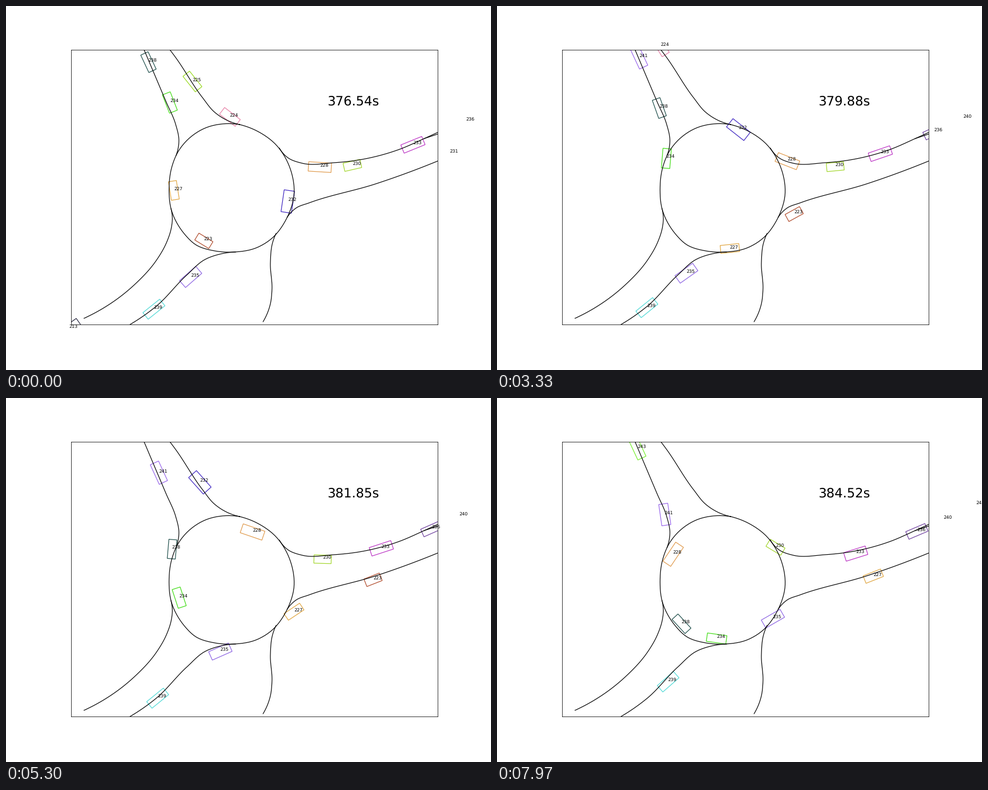
Write a matplotlib script that moves like this. It is 864 px wide and 648 px high and loops after 8 s.

```python
import math
import numpy as np
import matplotlib.pyplot as plt
from matplotlib.animation import FuncAnimation
from matplotlib.patches import Polygon

W, H = 864, 648
LOOP, INTERVAL = 8000, 32
FPS, FIRST, LAST_STEP = 29.97, 11285, 239
LEFT, RIGHT, TOP, BOTTOM = 116.4, 769.2, 77.76, 567.36
KEY_STEPS = np.array([0, 64, 137, 239])

plt.rcParams["font.family"] = "DejaVu Sans"
plt.rcParams["text.hinting"] = "none"
fig = plt.figure(figsize=(W / 72, H / 72), dpi=72, facecolor="white")
ax = fig.add_axes([LEFT / W, 1 - BOTTOM / H, (RIGHT - LEFT) / W, (BOTTOM - TOP) / H])
ax.set(xlim=(LEFT, RIGHT), ylim=(BOTTOM, TOP), xticks=[], yticks=[])
for spine in ax.spines.values():
    spine.set_linewidth(0.8)


def tangents(t, v):
    return np.gradient(v, t, axis=0, edge_order=min(2, len(t) - 1))


def hermite(t, v, m, x):
    """Smooth value at x between the keys v with tangents m."""
    i = int(np.clip(np.searchsorted(t, x, "right") - 1, 0, len(t) - 2))
    h = t[i + 1] - t[i]
    u = (x - t[i]) / h
    return ((1 + 2 * u) * (1 - u)**2 * v[i] + u * (1 - u)**2 * h * m[i]
            + u * u * (3 - 2 * u) * v[i + 1] + u * u * (u - 1) * h * m[i + 1])


class Path:
    """Smooth curve through points, measured by distance along them."""

    def __init__(self, *points):
        self.p = np.array(points, float)
        steps = np.hypot(*np.diff(self.p, axis=0).T)
        self.s = np.concatenate([[0], np.cumsum(steps)])
        self.m = tangents(self.s, self.p)
        self.length = self.s[-1]

    def at(self, s):
        return hermite(self.s, self.p, self.m, s)

    def heading(self, s):
        d = self.at(s + 0.5) - self.at(s - 0.5)
        return d / np.hypot(*d)


def road(*points):
    path = Path(*points)
    xy = np.array([path.at(s) for s in np.linspace(0, path.length, 120)])
    ax.plot(xy[:, 0], xy[:, 1], color="black", lw=1.2)


# roundabout, then its arms clockwise from the north
road((416, 211), (450, 224), (480, 246), (505, 286), (513, 337), (501, 376),
     (472, 415), (446, 430.5), (405, 438), (372, 436), (338, 425), (318, 406),
     (294, 361), (290.5, 325), (294.5, 290), (308, 257), (328, 234), (358, 216),
     (385, 210), (416, 211))
road((246, 78), (285, 170), (302, 210), (308, 240), (303, 266))
road((292, 78), (301, 90), (350, 163), (371, 188.5), (396, 204.5), (416, 211))
road((487, 253), (502, 270), (528, 280), (584, 279), (632, 273.5),
     (700, 255.5), (745, 236), (769, 225))
road((745, 236), (769, 228))
road((501, 376), (517, 359.5), (540, 350.5), (659, 316.5), (769, 276))
road((458, 562), (471, 530), (473.8, 505), (471, 457), (475, 421), (481, 405))
road((221, 567), (267, 535), (322, 479), (355, 451), (380, 442), (409, 438))
road((294, 361), (296.3, 378), (294.5, 395), (286, 421), (267, 454),
     (229, 496), (139, 556))

# lanes the cars drive along
north_east = Path((237, 57), (252, 89), (265, 117), (281.5, 154), (298, 202),
                  (301, 234), (298, 285), (299, 328), (320.5, 387),
                  (353.5, 418.7), (414.8, 431.7), (471, 407.5), (536, 367),
                  (606, 342), (712, 301), (830, 257))
west_east = Path((263.5, 539.8), (305, 505), (337, 476), (361.2, 461.4),
                 (410, 438.7), (491.6, 392.8), (536, 367))
ring_north = Path((488, 386), (502, 348), (495, 294.7), (475, 260), (430, 220),
                  (399, 197.5), (358.5, 164), (331, 133), (293.5, 75), (280, 53))
east_ring = Path((870, 182), (815, 207), (748, 237.5), (703, 255.7), (639, 277),
                 (616, 284), (579, 287), (551, 286), (514.2, 275),
                 (469.2, 250.5), (400.3, 231.4), (350, 244), (313.2, 279.2))
west_out = Path((139, 555), (112.5, 573.7))


class Car:
    """Box and label, shown while its distance lies on the lane."""

    def __init__(self, name, color, length, width, lane, dist, side=0):
        self.lane, self.side = lane, side
        self.dist = np.array(dist, float)
        # never roll backwards, never overshoot a standstill
        pace = np.diff(self.dist) / np.diff(KEY_STEPS)
        limit = 3 * np.minimum(np.r_[pace[0], pace], np.r_[pace, pace[-1]])
        self.pace = np.clip(tangents(KEY_STEPS, self.dist), 0, limit)
        self.corners = np.array([(-1, -1), (1, -1), (1, 1), (-1, 1)]) * (length / 2, width / 2)
        self.box = ax.add_patch(Polygon(self.corners, fill=False, edgecolor=color, lw=1.2))
        self.label = ax.text(0, 0, name, fontsize=8)

    def update(self, step):
        s = hermite(KEY_STEPS, self.dist, self.pace, step)
        shown = 0 <= s <= self.lane.length
        self.box.set_visible(shown)
        self.label.set_visible(shown)
        if shown:
            c, d = self.lane.heading(s)
            pos = self.lane.at(s) + self.side * np.array([d, -c])
            self.box.set_xy(self.corners @ np.array([(c, d), (-d, c)]) + pos)
            self.label.set_position(pos)


cars = [
    Car("213", "#22223a", 40, 14, west_out, (32, 180, 350, 590)),
    Car("223", "#b04a2a", 29.3, 14.3, north_east, (391, 511, 667, 922)),
    Car("224", "#e77fa5", 35.3, 15, ring_north, (233, 327, 482, 700)),
    Car("225", "#97d91c", 35.3, 15, ring_north, (325, 437, 565, 740)),
    Car("227", "#e0a53f", 33.4, 14.2, north_east, (284, 392, 523, 736)),
    Car("228", "#e09a4c", 40.8, 16.7, east_ring, (331, 340, 428, 602)),
    Car("230", "#a2d62b", 30.8, 14.8, east_ring, (273, 275, 311, 398)),
    Car("231", "#555555", 34, 14, north_east, (868, 1034, 1220, 1480), 9),
    Car("232", "#3b22c0", 39.3, 18.7, ring_north, (40.5, 134, 262, 474)),
    Car("233", "#bb33c4", 40.3, 15.8, east_ring, (159, 194, 212, 250)),
    Car("234", "#3fdc13", 35, 15, north_east, (127, 180, 281, 431), 3),
    Car("235", "#8c63e3", 38.5, 16.3, west_east, (87, 87, 126, 273)),
    Car("236", "#6e3f9e", 37, 14.7, east_ring, (56, 84, 116, 134)),
    Car("238", "#1d4d49", 34.2, 14.4, north_east, (46, 90, 191, 363), -3),
    Car("239", "#4fd9d6", 38.3, 15, west_east, (0, 4, 5, 54)),
    Car("240", "#777777", 34, 14, east_ring, (-5, 25, 61, 82)),
    Car("241", "#9765ea", 38.3, 16.2, north_east, (-45, 12, 65, 163)),
    Car("242", "#777777", 34, 14, east_ring, (-80, -40, -2, 18)),
    Car("243", "#72ee2a", 38.5, 16, north_east, (-100, -60, -21, 35), -2),
]
clock = ax.text(572.3, 177, "", fontsize=23)


def draw(i):
    step = min(math.ceil(i * INTERVAL * (LAST_STEP + 1) / LOOP), LAST_STEP)
    for car in cars:
        car.update(step)
    clock.set_text(f"{(FIRST + step) / FPS:.2f}s")
    return []


anim = FuncAnimation(fig, draw, frames=LOOP // INTERVAL, init_func=lambda: draw(0),
                     interval=INTERVAL, repeat=True, repeat_delay=0)
plt.show()
```
